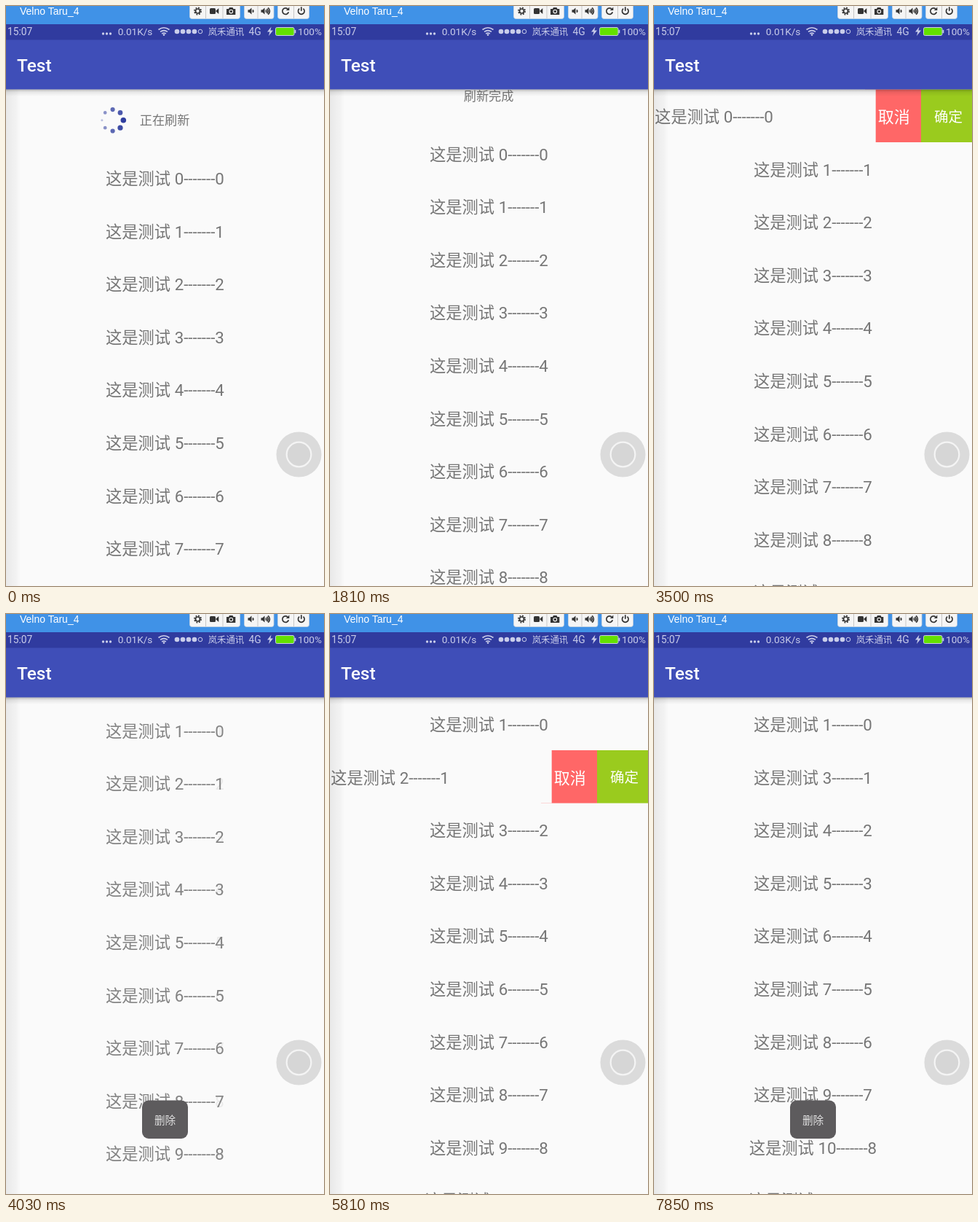
These frames come from a looping animation (437x796 px, 8000 ms). An HTML page:

```html
<!DOCTYPE html>
<html lang="zh-CN">
<head>
<meta charset="utf-8">
<title>List demo</title>
<style>
  html, body { margin: 0; width: 100%; height: 100%; overflow: hidden; background: #fafafa; }
  svg { display: block; width: 437px; height: 796px; font-family: Roboto, 'Noto Sans CJK SC', 'Noto Sans CJK', sans-serif; }
  .list { font-size: 22.3px; fill: #767676; text-anchor: middle; }
  .status { font-size: 13.2px; fill: #c9cdea; }
  .icon { fill: #333; }
  .line { fill: none; stroke: #333; stroke-width: 1.7; }
</style>
</head>
<body>
<svg viewBox="0 0 437 796">
  <defs>
    <linearGradient id="drop" x2="0" y2="1">
      <stop offset="0" stop-color="#000" stop-opacity=".28"/>
      <stop offset=".4" stop-color="#000" stop-opacity=".08"/>
      <stop offset="1" stop-color="#000" stop-opacity="0"/>
    </linearGradient>
    <linearGradient id="side">
      <stop offset="0" stop-color="#000" stop-opacity=".07"/>
      <stop offset=".7" stop-color="#000" stop-opacity=".03"/>
      <stop offset="1" stop-color="#000" stop-opacity="0"/>
    </linearGradient>
  </defs>
  <rect width="437" height="796" fill="#fafafa"/>

  <g id="header">
    <g id="spinner" fill="#303f9f"></g>
    <text id="message" x="183.7" y="163.4" font-size="17.2" fill="#767676"></text>
  </g>
  <g id="menu">
    <rect x="290" y="114.4" width="77" height="72.6" fill="#ff6767"/>
    <rect x="367" y="114.4" width="70" height="72.6" fill="#9acb1e"/>
    <g fill="#fff" text-anchor="middle">
      <text x="329.8" y="160" font-size="22">取消</text>
      <text x="404.5" y="158.5" font-size="19.5">确定</text>
    </g>
    <rect id="cover" y="114.4" height="72.6" fill="#fafafa"/>
  </g>
  <g id="rows" class="list"></g>
  <rect y="114" width="20" height="682" fill="url(#side)"/>
  <rect y="114" width="437" height="10" fill="url(#drop)"/>

  <circle cx="402.5" cy="615.5" r="31" fill="#dbdbdb"/>
  <circle cx="402.5" cy="615.5" r="16.8" fill="#d6d6d6" stroke="#f4f4f4" stroke-width="2.2"/>

  <g id="toast">
    <rect x="187" y="667.5" width="63" height="52.5" rx="9" fill="#5d5b5d"/>
    <text x="218.5" y="699.5" font-size="14.6" fill="#e2e2e2" text-anchor="middle">删除</text>
  </g>

  <rect y="46" width="437" height="68.4" fill="#3f4eb8"/>
  <text x="15" y="90.3" font-size="24.4" font-weight="500" fill="#fff">Test</text>

  <rect y="24" width="437" height="22.5" fill="#303b9f"/>
  <g class="status">
    <text x="2" y="39.8" font-size="13.8">15:07</text>
    <text id="speed" x="153.7" y="39.8" font-size="13.6"></text>
    <text x="277.7" y="39.6" font-size="12.4">岚禾通讯</text>
    <text x="333.5" y="39.8" font-size="13.8">4G</text>
    <text x="401" y="39.8" font-size="13.6">100%</text>
    <g id="dots"></g>
    <g fill="none" stroke="#c9cdea" stroke-width="1.6">
      <path d="M209.5 32.5q7.5-5.5 15 0M212 35.4q5-3.6 10 0M214.2 38q2.8-2 5.6 0"/>
      <circle cx="267" cy="35" r="2.8" stroke-width="1"/>
    </g>
    <circle cx="217" cy="39.6" r="1.3"/>
    <path d="M364.5 28.5l-5.5 7h3.4l-1.4 5.5 6-7.4h-3.6z"/>
    <rect x="370.5" y="29.5" width="25.5" height="11" rx="2" fill="#63e000" stroke="#c9cdea"/>
    <rect x="396.5" y="32.8" width="1.8" height="4.4"/>
  </g>

  <rect width="437" height="25" fill="#4092e7"/>
  <text x="19" y="12" font-size="14" fill="#fff" font-family="'Liberation Sans', sans-serif">Velno Taru_4</text>
  <g fill="#f5f5f5" stroke="#c8d4e0" stroke-width=".8">
    <rect x="252.5" y="-6" width="69" height="23.5" rx="3"/>
    <rect x="327.5" y="-6" width="40.5" height="23.5" rx="3"/>
    <rect x="373.5" y="-6" width="43" height="23.5" rx="3"/>
    <path stroke="#bbb" d="M274.5 0v17M298 0v17M346 0v17M395.5 0v17"/>
  </g>
  <circle class="line" cx="263.5" cy="7" r="3" stroke-width="2.6"/>
  <circle class="line" cx="263.5" cy="7" r="4.6" stroke-width="1.7" stroke-dasharray="1.9 1.713"/>
  <g class="icon">
    <rect x="280" y="3" width="8" height="8" rx="1.5"/>
    <path d="M288 7l4.3-4v8z"/>
    <path d="M303 4h3l1-2h4.500l1 2h2.800v8h-12.300z"/>
    <path d="M332.500 5.300h2l3-2.800v9l-3-2.700h-2zM350.500 5.300h2l3-2.800v9l-3-2.700h-2z"/>
  </g>
  <circle cx="309.300" cy="7.600" r="2.300" fill="#333" stroke="#f5f5f5" stroke-width="1.100"/>
  <path class="line" stroke-width="1.200" d="M339 5.300q1.600 1.700 0 3.400M357 5.300q1.600 1.700 0 3.400M358.600 3.700q3 3.300 0 6.600M360.200 2.200q4.400 4.800 0 9.600"/>
  <path class="line" d="M388.300 8.200a4.300 4.300 0 1 1-1.300-4.300"/>
  <path class="icon" d="M389.300 1.500v4.500h-4.500z"/>
  <path class="line" d="M403.200 3.600a4.300 4.300 0 1 0 5.200 0M405.800 1.200v5.600"/>
</svg>
<script>
const LOOP = 8000, PITCH = 72.6, ROWS = 12, OPEN = 136;
const $ = id => document.getElementById(id);
const add = (parent, tag, attrs = {}) => {
  const el = document.createElementNS('http://www.w3.org/2000/svg', tag);
  set(el, attrs);
  return parent.appendChild(el);
};
function set(el, attrs) {
  for (const key in attrs) el.setAttribute(key, attrs[key]);
}
const ramp = (t, start, length) => Math.min(1, Math.max(0, (t - start) / length));
const ease = x => 0.5 - Math.cos(Math.PI * x) / 2;
const decelerate = x => 1 - (1 - x) ** 2;
const shift = (x, y) => `translate(${x} ${y})`;

const balls = Array.from({ length: 8 }, (_, i) => add($('spinner'), 'circle', {
  cx: 146.6 + 14.7 * Math.cos(i * Math.PI / 4),
  cy: 156.8 + 14.7 * Math.sin(i * Math.PI / 4)
}));
const rows = Array.from({ length: ROWS }, () => {
  const g = add($('rows'), 'g');
  return { g, before: add(g, 'text', { x: 218.4 }), after: add(g, 'text', { x: 218.4 }) };
});
for (let i = 0; i < 3; i++) add($('dots'), 'circle', { cx: 133.5 + i * 5, cy: 38, r: 1.7 });
for (let i = 0; i < 4; i++) add($('dots'), 'circle', { cx: 235 + i * 8, cy: 35, r: 3.3 });

// Each step swipes one row open, then deletes it.
const steps = [
  { row: 0, swipe: 2840, swipeTime: 490, remove: 3717, label: i => i },
  { row: 1, swipe: 5420, swipeTime: 390, remove: 6377, label: i => i + 1 }
];

function drawSpinner(t) {
  balls.forEach((ball, i) => {
    const delay = i < 7 ? i * 120 : 780;
    const x = ease(((t + 1980 - delay) % 1000) / 1000);
    const fade = 1 - Math.abs(1 - 2 * x);
    set(ball, { r: 3.8 * (1 - 0.6 * fade), opacity: 1 - 0.7 * fade });
  });
  $('spinner').setAttribute('visibility', t < 1550 ? 'visible' : 'hidden');
  $('message').textContent = t < 1550 ? '正在刷新' : '刷新完成';
}

function drawList(t, scroll) {
  const step = steps[t < 4800 ? 0 : 1];
  const slide = OPEN * ease(ramp(t, step.swipe, step.swipeTime));
  const visible = 1 - ease(ramp(t, step.remove, 120));
  const move = ease(ramp(t, step.remove + 120, 250));

  rows.forEach(({ g, before, after }, i) => {
    const removed = i === step.row;
    const target = i > step.row ? i - 1 : i;
    const y = 160 + scroll + PITCH * (i + (target - i) * move);
    set(g, { transform: shift(removed ? -slide : 0, y), opacity: removed ? visible : 1 });
    const text = `这是测试 ${step.label(i)}-------`;
    before.textContent = text + i;
    after.textContent = text + target;
    set(before, { opacity: removed ? 1 : 1 - move });
    set(after, { opacity: removed ? 0 : move });
  });

  set($('menu'), {
    transform: shift(0, PITCH * step.row),
    opacity: visible,
    visibility: slide > 0 ? 'visible' : 'hidden'
  });
  $('cover').setAttribute('width', 440.7 - slide);
}

function drawToast(t) {
  const shown = t < 6000
    ? decelerate(ramp(t, 3730, 300)) * (1 - ramp(t, 5600, 190))
    : decelerate(ramp(t, 6390, 300));
  set($('toast'), { opacity: shown, transform: shift(0, 18 * (1 - shown)) });
}

function draw(t) {
  const scroll = 85 * (1 - ease(ramp(t, 1660, 350)));
  $('header').setAttribute('transform', shift(0, scroll - 85));
  drawSpinner(t);
  drawList(t, scroll);
  drawToast(t);
  $('speed').textContent = t < 7850 ? '0.01K/s' : '0.03K/s';
}

const start = performance.now();
function tick() {
  draw((performance.now() - start) % LOOP);
  requestAnimationFrame(tick);
}
tick();
</script>
</body>
</html>
```
